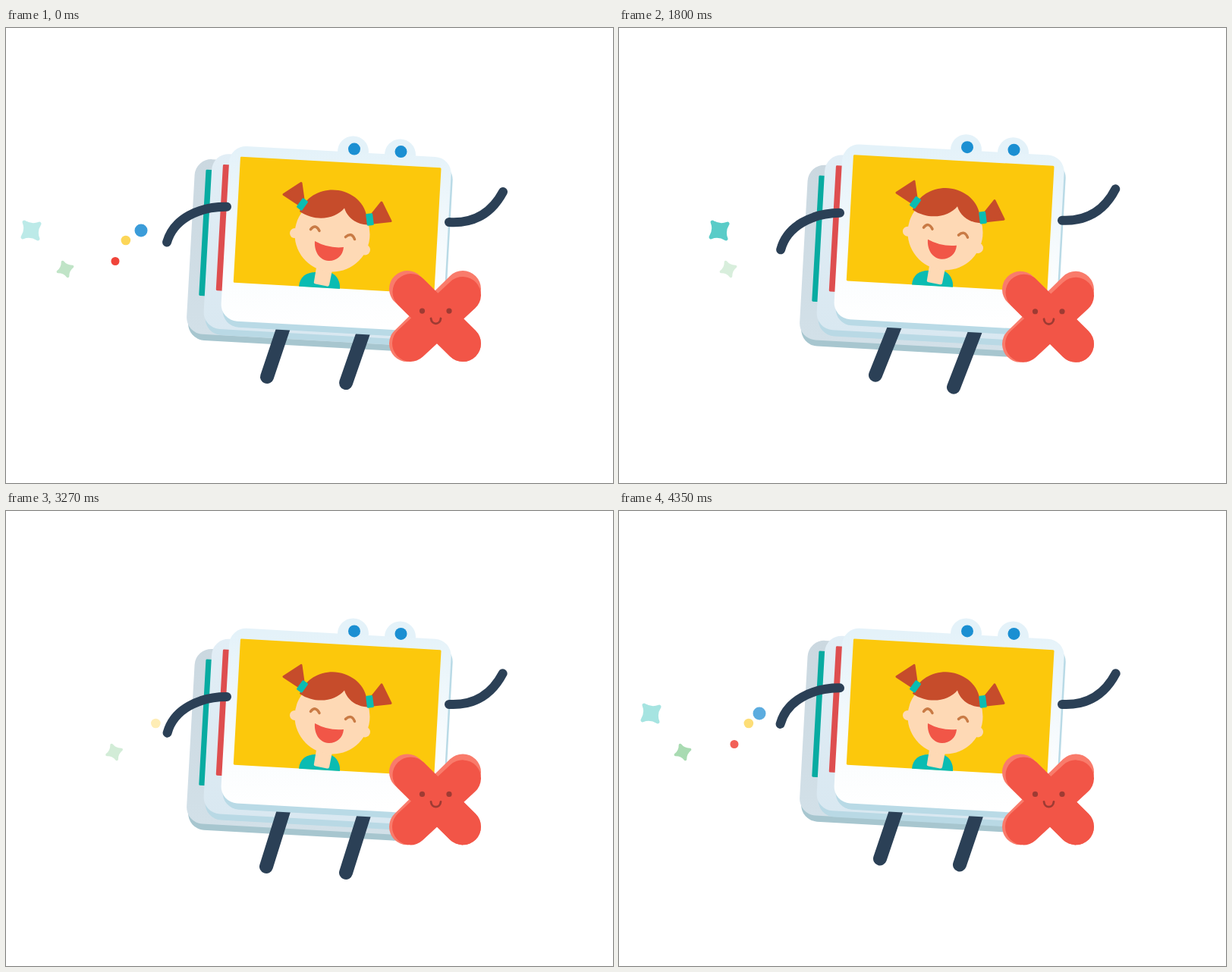
Animation of 800x600 px, one loop 4.38 s. Source, as an HTML page:

```html
<!DOCTYPE html>
<html lang="en">
<head>
<meta charset="utf-8">
<title>Running photo cards</title>
<style>
html, body { margin: 0; width: 100%; height: 100%; overflow: hidden; background: #fff; }
svg { display: block; width: 100vw; height: 100vh; }
.line { fill: none; stroke-linecap: round; stroke-linejoin: round; }
.limb { stroke: #2b4056; }
</style>
</head>
<body>
<svg viewBox="0 0 800 600">
  <defs>
    <linearGradient id="face" x1=".4" y1="0" x2=".5" y2="1">
      <stop offset="0" stop-color="#e4f2f9"/><stop offset=".75" stop-color="#fbfdfe"/><stop offset="1" stop-color="#fff"/>
    </linearGradient>
    <linearGradient id="faceMid" x2="0" y2="1">
      <stop offset="0" stop-color="#e2eef6"/><stop offset="1" stop-color="#d9e8f1"/>
    </linearGradient>
    <linearGradient id="faceBack" x2="0" y2="1">
      <stop offset="0" stop-color="#cbd8e0"/><stop offset="1" stop-color="#d2e0e8"/>
    </linearGradient>
    <path id="star" d="M-10-10Q0-5 10-10Q5 0 10 10Q0 5-10 10Q-5 0-10-10Z" stroke-width="5" stroke-linejoin="round"/>
    <rect id="card" x="-14.5" y="-14" width="293" height="231" rx="22"/>
    <rect id="photo" width="265" height="166.5" rx="1.5"/>
  </defs>

  <g id="bits"></g>

  <g id="back"><g transform="translate(263.5 169) rotate(3.2)">
    <use href="#card" x="2.5" y="8" fill="#a7c6cf"/>
    <use href="#card" fill="url(#faceBack)"/>
    <use href="#photo" fill="#08aba1"/>
  </g></g>

  <g id="mid"><g transform="translate(286 163.5) rotate(3.2)">
    <use href="#card" x="2.5" y="8" fill="#b9d9e5"/>
    <use href="#card" fill="url(#faceMid)"/>
    <use href="#photo" fill="#de4e4f"/>
  </g></g>

  <g id="front">
    <path id="legs" class="line limb" stroke-width="18"/>
    <g transform="translate(309 153.5) rotate(3.2)">
      <use href="#card" x="2.5" y="8" fill="#b9dae6"/>
    </g>
    <g fill="#e4f2f9"><circle cx="457.5" cy="147" r="20.5"/><circle cx="519.5" cy="151" r="20.5"/></g>
    <g transform="translate(309 153.5) rotate(3.2)">
      <use href="#card" fill="url(#face)"/>
      <use href="#photo" fill="#fcc80c"/>
    </g>
    <g fill="#1b8fd2"><circle cx="459" cy="143.5" r="8"/><circle cx="520.5" cy="147" r="8"/></g>

    <!-- girl -->
    <path fill="#0abcb2" d="M386 324.8C387 312 396 306 408 306L429 307C436 310 441 319 440 328Z"/>
    <g fill="#fed9b5">
      <path d="M409 300L430 303L426 323Q425 325 423 324.500L408 321.500Q405 321 406 318Z"/>
      <circle cx="380.500" cy="254.500" r="6.500"/><circle cx="473" cy="276.500" r="7"/>
      <circle cx="430" cy="256" r="49.500"/>
    </g>
    <g fill="#c64c2b" stroke="#c64c2b" stroke-width="3" stroke-linejoin="round">
      <path d="M366 203.500L389 188.500L392 210L385 216Z"/>
      <path d="M495 214L507 238.500L484 241L483 229Z"/>
    </g>
    <path fill="#c64c2b" d="M387 226C396 204 418 195 438 198C462 202 478 221 476 243.500C463 243 450 235 446 221.500C434 236 408 240 387 226Z"/>
    <g fill="#0abcb2">
      <rect x="-4.500" y="-7.500" width="9" height="15" rx="1.500" transform="translate(390.500 216.500) rotate(36)"/>
      <rect x="-4.500" y="-8" width="9" height="16" rx="1.500" transform="translate(479.500 236.500) rotate(-7)"/>
    </g>
    <path class="line" stroke="#c97b45" stroke-width="3.5" d="M401.500 249.500Q408 241.500 413 251.500M447.500 259.500Q455.500 252.500 459.500 262.500"/>
    <path fill="#f15647" d="M407 265Q425 275 445 273C444 285 435 291.500 425 291C413 290 406 279 407 265Z"/>
  </g>

  <path id="armL" class="line limb" stroke-width="12" d="M0 0C-36 5-67 26-71 58"/>
  <path id="armR" class="line limb" stroke-width="12" d="M0 0C32 2 56-12 71-40"/>

  <g id="cross">
    <path class="line" stroke="#f97b6b" stroke-width="48" d="M529 349L602 421M602 349L529 421"/>
    <path class="line" stroke="#f25547" stroke-width="48" d="M533.500 353L602 421M602 357L533 421"/>
    <g fill="#9e3b33"><circle cx="548.500" cy="378" r="3.600"/><circle cx="584" cy="378" r="3.600"/></g>
    <path class="line" stroke="#9e3b33" stroke-width="2.800" d="M560 388C561 397 572 397 573 388"/>
  </g>
</svg>
<script>
const $ = id => document.getElementById(id);
const LOOP = 4380, STRIDE = 1500, CYCLE = 2250;
const mod = (a, n) => (a % n + n) % n;
const set = (el, name, value) => el.setAttribute(name, value);

// x0, x1, y, duration, colour, size, rotation (stars only), start times
const bits = [
  [199, 6, 267, 643, '#12b7b0', 1, 6, [283, 1697]],
  [205, 12, 228, 643, '#fcd34b', 1, 4, [1157]],
  [154, 62, 318, 460, '#4db560', .72, 25, [420, 1083, 1870]],
  [220, 126, 267, 403, '#2490d4', 8.5, null, [2070]],
  [229, 75, 280, 355, '#fcd34b', 6.3, null, [1067, 2086]],
  [197, 91, 307.5, 400, '#f0443a', 5.5, null, [2050]]
].map(([x0, x1, y, dur, color, size, turn, starts]) => {
  const el = document.createElementNS('http://www.w3.org/2000/svg', turn === null ? 'circle' : 'use');
  if (turn === null) set(el, 'r', size);
  else { set(el, 'href', '#star'); set(el, 'stroke', color); }
  set(el, 'fill', color);
  $('bits').append(el);
  const pose = turn === null ? '' : ` rotate(${turn}) scale(${size})`;
  return u => {
    const age = Math.min(...starts.map(s => mod(u - s, CYCLE)));
    const p = Math.min(1, age / dur);
    set(el, 'transform', `translate(${x0 + (x1 - x0) * p} ${y})${pose}`);
    set(el, 'opacity', 1 - Math.abs(2 * p - 1));
  };
});

// time, left foot x y, right foot x y
const steps = [
  [0, 344, 444, 448, 452], [390, 343, 454, 448, 462], [420, 338, 444, 441, 460],
  [540, 333, 438, 434, 460], [800, 334, 435, 436, 451], [1140, 341, 438, 446, 449],
  [1200, 344.5, 443, 449, 450], [1470, 344, 443.5, 449, 451.5], [1500, 344, 444, 448, 452]
];
function feet(u) {
  const i = steps.findIndex(s => s[0] > u), a = steps[i - 1], b = steps[i];
  const k = (u - a[0]) / (b[0] - a[0]);
  return a.map((v, j) => v + (b[j] - v) * k);
}

function sink(u, delay, depth) {
  const d = mod(u - 1200 - delay, STRIDE);
  return d < 960 ? depth * Math.sin(Math.PI * d / 960) : 0;
}

function draw(now) {
  const t = Math.floor(mod(now, LOOP) / 30) * 30;
  const u = t < 800 ? t : t + 120; // the run skips ahead once per loop
  const front = sink(u, 0, 19.3), back = sink(u, 95, 28.5), lean = front / 16;
  const drop = (id, y) => set($(id), 'transform', `translate(0 ${y})`);
  drop('front', front);
  drop('mid', sink(u, 45, 22));
  drop('back', back);
  drop('cross', -front * .31);
  const [, lx, ly, rx, ry] = feet(u % STRIDE);
  set($('legs'), 'd', `M375.5 350L${lx} ${ly}M482 354L${rx} ${ry}`);
  set($('armL'), 'transform', `translate(291 ${217 + back * 1.06}) rotate(${8.6 * lean})`);
  set($('armR'), 'transform', `translate(584 ${240 + front}) rotate(${7 * lean - 7})`);
  bits.forEach(move => move(u));
  requestAnimationFrame(draw);
}
draw(0);
</script>
</body>
</html>
```
